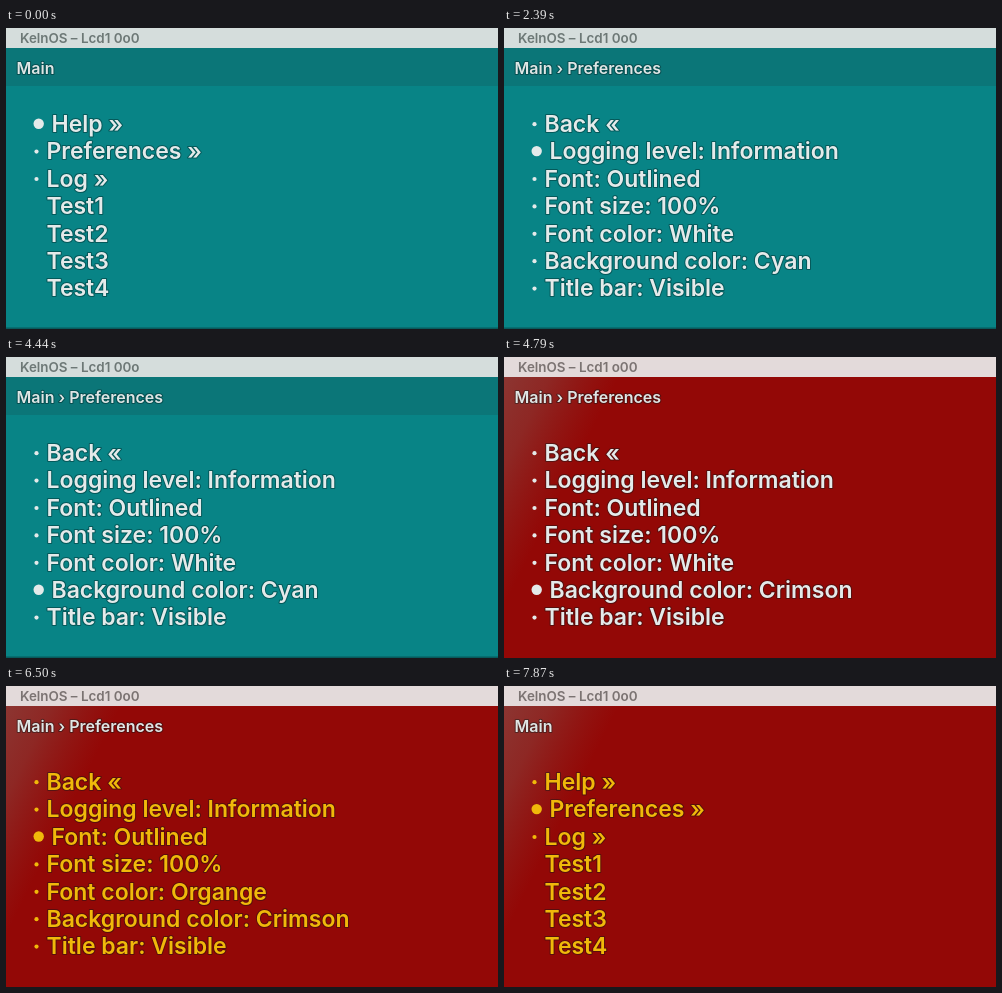
Recreate the animation shown at these times as an HTML page with a canvas. Size 492 by 301 pixels, loop 8 s.

```html
<!DOCTYPE html>
<html lang="en">
<head>
<meta charset="utf-8">
<title>LCD menu</title>
<style>
html, body { margin: 0; width: 100%; height: 100%; overflow: hidden; background: #088486; }
canvas { display: block; }
</style>
</head>
<body>
<canvas id="lcd" width="492" height="301"></canvas>
<script>
const W = 492, H = 301, LOOP = 8000, TICK = 341.9;
const ctx = document.getElementById('lcd').getContext('2d');
const FACE = 'Inter, Roboto, sans-serif';

// Selected row after each key press: [tick, menu, row]
const presses = [
  [0, 'main', 0], [4, 'main', 1], [5, 'prefs', 0], [7, 'prefs', 1],
  [8, 'prefs', 2], [9, 'prefs', 3], [10, 'prefs', 4], [11, 'prefs', 5],
  [15, 'prefs', 4], [18, 'prefs', 3], [19, 'prefs', 2], [20, 'prefs', 1],
  [21, 'prefs', 0], [22, 'main', 1]
];
const CRIMSON_AT = 14, ORANGE_AT = 17;

const spinner = { A: 'o00', B: '0o0', C: '00o' };
const spins = 'BABBCACBCAABCCABCACBCACB';

const themes = {
  cyan: { bar: '#d5dddc', label: '#6d7876', body: '#088486', crumb: '#0b7678' },
  crimson: { bar: '#e3dada', label: '#7b7372', body: '#930806' }
};

function menuItems(menu, crimson, orange) {
  if (menu === 'main') {
    return ['Help »', 'Preferences »', 'Log »', 'Test1', 'Test2', 'Test3', 'Test4'];
  }
  return [
    'Back «', 'Logging level: Information', 'Font: Outlined', 'Font size: 100%',
    'Font color: ' + (orange ? 'Organge' : 'White'),
    'Background color: ' + (crimson ? 'Crimson' : 'Cyan'),
    'Title bar: Visible'
  ];
}

function rect(x, y, w, h, fill) {
  ctx.fillStyle = fill;
  ctx.fillRect(x, y, w, h);
}

function dot(x, y, r, fill) {
  ctx.fillStyle = fill;
  ctx.beginPath();
  ctx.arc(x, y, r, 0, Math.PI * 2);
  ctx.fill();
}

function label(str, x, y, size, fill, outline) {
  ctx.font = `600 ${size}px ${FACE}`;
  if (outline) {
    ctx.strokeStyle = 'rgba(0, 25, 25, 0.4)';
    ctx.lineWidth = 2;
    ctx.lineJoin = 'round';
    ctx.strokeText(str, x, y);
  }
  ctx.fillStyle = fill;
  ctx.fillText(str, x, y);
}

function drawScreen(theme) {
  rect(0, 0, W, H, theme.body);
  if (theme.crumb) {
    rect(0, 20, W, 38, theme.crumb);
    rect(0, 299.5, W, 1.5, '#075b5d');
  } else {
    const glare = ctx.createLinearGradient(0, 20, 92, 66);
    glare.addColorStop(0, 'rgba(140, 56, 52, 0.95)');
    glare.addColorStop(0.4, 'rgba(140, 50, 46, 0.75)');
    glare.addColorStop(1, 'rgba(140, 40, 36, 0)');
    rect(0, 20, W, H - 20, glare);
  }
  rect(0, 0, W, 20, theme.bar);
}

function draw(t) {
  const tick = Math.min(23, Math.floor((t + 14) / TICK));
  const [, menu, selected] = presses.filter(p => p[0] <= tick).pop();
  const crimson = tick >= CRIMSON_AT, orange = tick >= ORANGE_AT;
  const theme = crimson ? themes.crimson : themes.cyan;
  const ink = orange ? '#f0b90a' : '#e4eaea';

  drawScreen(theme);
  label('KelnOS – Lcd1 ' + spinner[spins[tick]], 14, 14.5, 13.4, theme.label);
  label(menu === 'main' ? 'Main' : 'Main › Preferences', 10.5, 46, 16, '#dfe6e5', true);

  menuItems(menu, crimson, orange).forEach((item, i) => {
    const y = 95.7 + i * 27.4, on = i === selected;
    if (on) dot(32.7, y, 5.2, ink);
    else if (!item.startsWith('Test')) dot(30.5, y + 0.5, 2.1, ink);
    label(item, on ? 45.5 : 40.5, y + 8.3, 23, ink, true);
  });
}

function frame(now) {
  draw(now % LOOP);
  requestAnimationFrame(frame);
}
draw(0);
requestAnimationFrame(frame);
</script>
</body>
</html>
```
